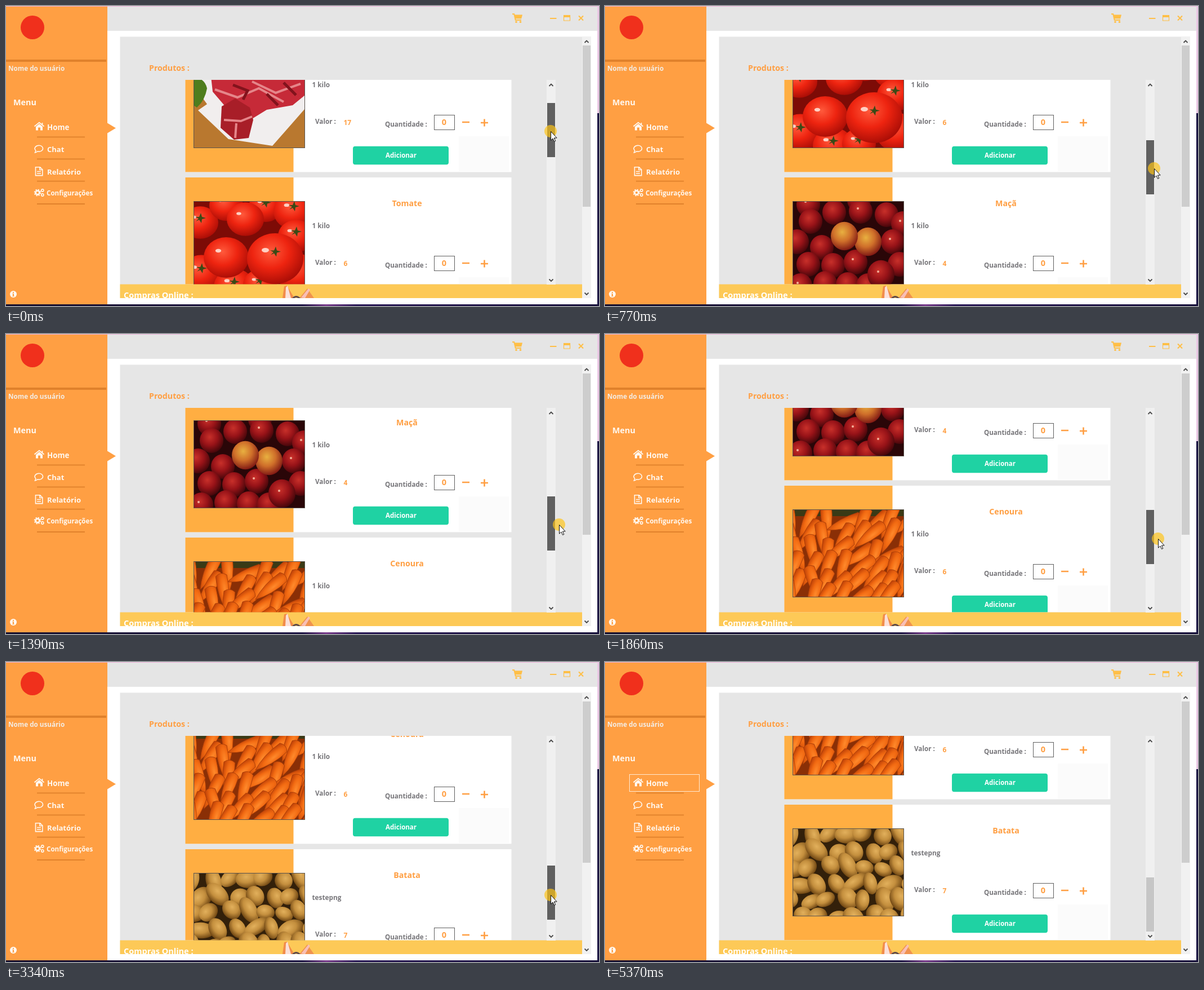
Write an HTML page that moves like this. It is 1053 by 532 pixels and loops after 5520 ms.

```html
<!DOCTYPE html>
<html lang="pt">
<head>
<meta charset="utf-8">
<title>Produtos</title>
<style>
html, body { margin: 0; width: 100%; height: 100%; overflow: hidden; background: #fff; }
svg { display: block; width: 1053px; height: 532px; }
text { font-family: "Open Sans", "Noto Sans", sans-serif; font-weight: 700; }
</style>
</head>
<body>
<svg id="stage" viewBox="0 0 1053 532" xmlns="http://www.w3.org/2000/svg">
  <defs>
    <clipPath id="listClip"><rect x="318" y="131" width="580" height="362.5"/></clipPath>
    <clipPath id="photoClip"><rect width="198" height="156"/></clipPath>
    <clipPath id="panelClip"><rect x="202" y="54" width="821" height="464"/></clipPath>
    <linearGradient id="edge">
      <stop offset="0" stop-color="#17112e"/><stop offset=".5" stop-color="#1d1644"/>
      <stop offset=".54" stop-color="#7a3c8c"/><stop offset=".59" stop-color="#2a1a56"/>
      <stop offset="1" stop-color="#17113a"/>
    </linearGradient>
  </defs>

  <!-- window -->
  <rect width="1053" height="532" fill="#fff"/>
  <rect x="180" y="1" width="870" height="43" fill="#e5e5e5"/>
  <rect width="1053" height="1" fill="#f0b4dc"/>
  <rect x="1050" width="3" height="190" fill="#ecc9e6"/>
  <rect x="1050" y="190" width="3" height="342" fill="#1b1542"/>
  <rect y="529" width="1053" height="3" fill="url(#edge)"/>

  <!-- sidebar -->
  <rect y="1" width="180" height="528" fill="#ff9f43"/>
  <circle cx="47" cy="38" r="21" fill="#f0301c"/>
  <rect y="95" width="178" height="4" fill="#e0812b"/>
  <path d="M180 207.5L195 216.5L180 225.5Z" fill="#ff9f43"/>
  <g fill="#fff8f0">
    <text x="4" y="115" font-size="11.7" fill="#f3ece4">Nome do usuário</text>
    <text x="13" y="176" font-size="14.4">Menu</text>
    <text x="73" y="220" font-size="13.3">Home</text>
    <text x="73" y="259" font-size="13">Chat</text>
    <text x="73" y="299" font-size="13.1">Relatório</text>
    <text x="72" y="336" font-size="11.6">Configurações</text>
    <path d="M53 214L59 209L65 214V220.5H61V215.5H57V220.5H53Z"/>
    <path d="M50.5 213.5L59 206.5L67.5 213.5M64.5 207V211" fill="none" stroke="#fff8f0" stroke-width="1.7"/>
    <circle cx="13" cy="511" r="6"/>
    <path d="M12 507h2v2h-2zM11.3 510H14v4h.8v1h-3.6v-1h.8v-3h-.7z" fill="#ff9f43"/>
  </g>
  <g fill="none" stroke="#fff8f0" stroke-width="1.6">
    <path d="M51.5 260L53 256.5C48.5 252 53 247.3 58.5 247.3C63 247.3 65.5 250 65.5 252.7C65.5 256.5 61 259 56 257.8Q54 259.8 51.5 260Z"/>
    <path d="M52.5 285.8H60.5L64.8 290V300.6H52.5ZM60 286V290.5H64.5M55 293.5H62M55 297H62"/>
    <circle cx="56" cy="331" r="3.4" stroke-width="2.6"/>
    <circle cx="56" cy="331" r="5.4" stroke-width="1.8" stroke-dasharray="2.3 1.94"/>
    <circle cx="64.8" cy="327" r="2.1"/>
    <circle cx="64.8" cy="335" r="2.1"/>
  </g>
  <path d="M55 232.3H140M55 271.4H140M55 310.6H140M55 351H140" stroke="#e0812b" stroke-width="1.8"/>
  <rect id="focus" x="43.5" y="199.5" width="124" height="30" fill="none" stroke="#ffe9d2"/>

  <!-- title bar icons -->
  <g fill="none" stroke="#ffbf47" stroke-width="2">
    <path d="M899 14.2H902.3L904.8 25H915"/>
    <path d="M903 15.5H917L915.2 22.5H904.6Z" fill="#ffbf47" stroke="none"/>
    <g fill="#ffbf47" stroke="none"><circle cx="906" cy="28.2" r="1.8"/><circle cx="913.5" cy="28.2" r="1.8"/></g>
    <path d="M966 22H977.5"/>
    <path d="M990.5 16.8V26H1001.5V16.8" stroke-width="1.2"/>
    <path d="M990 18H1002" stroke-width="4"/>
    <path d="M1017 17.5L1025 25.5M1025 17.5L1017 25.5"/>
  </g>

  <!-- main panel -->
  <rect x="202.5" y="54.5" width="820.5" height="463.5" fill="#e6e6e6"/>
  <text x="254" y="115" font-size="14.2" fill="#ff9f43">Produtos :</text>
  <g clip-path="url(#listClip)"><g id="list"></g></g>
  <g clip-path="url(#panelClip)">
    <rect x="202.5" y="493.5" width="820.5" height="24.5" fill="#fdc957"/>
    <text x="209" y="518" font-size="14.5" fill="#fff">Compras Online :</text>
    <path d="M491 518L494 497L499 496L512 518Z" fill="#f28c4a"/>
    <path d="M497 499L500 496L506 518H496Z" fill="#fbe0d8"/>
    <path d="M521 518L535 501L547 518Z" fill="#f0924f"/>
    <path d="M524 517L537 501L540 503L531 518Z" fill="#f8bfb6"/>
    <path d="M509 519Q515 512 522 519" fill="none" stroke="#5f4a4a" stroke-width="3"/>
  </g>

  <!-- scroll bars -->
  <rect x="1023" y="54" width="16" height="464" fill="#f1f1f1"/>
  <rect x="1024" y="70" width="14" height="286" fill="#cdcdcd"/>
  <rect x="960" y="131" width="16" height="363" fill="#f0f0f0"/>
  <rect id="thumb" x="961" width="14" height="96"/>
  <path d="M1027.5 65L1031 61.5L1034.5 65M1027.5 508.5L1031 512L1034.5 508.5M964.5 142L968 138.5L971.5 142M964.5 484.5L968 488L971.5 484.5"
        fill="none" stroke="#4a4a4a" stroke-width="1.8"/>

  <g id="pointer">
    <circle id="halo" r="11"/>
    <path d="M.5 .5V16.2L4 12.9L6.5 18.4L8.8 17.4L6.4 12H11.2Z" fill="#fff" stroke="#111" stroke-width="1"/>
  </g>
</svg>
<script>
const NS = "http://www.w3.org/2000/svg";
const $ = id => document.getElementById(id);

function add(parent, tag, attrs, label) {
  const el = document.createElementNS(NS, tag);
  for (const key in attrs) el.setAttribute(key, attrs[key]);
  if (label !== undefined) el.textContent = label;
  parent.appendChild(el);
  return el;
}

function seeded(seed) {
  return () => (seed = (seed * 16807) % 2147483647) / 2147483647;
}

// Soft ball shading: light near the upper left, dark at the rim.
function shade(id, light, mid, dark) {
  const g = add(document.querySelector("defs"), "radialGradient", { id, cx: .42, cy: .36, r: .66 });
  [[0, light], [.5, mid], [1, dark]].forEach(([offset, color]) =>
    add(g, "stop", { offset, "stop-color": color }));
  return `url(#${id})`;
}

const fills = {
  tomato: shade("tomato", "#ff5a3c", "#ee2410", "#a90d06"),
  apple: shade("apple", "#c8302a", "#981318", "#42060a"),
  gold: shade("gold", "#e8b040", "#cf6f2a", "#7e1713"),
  carrot: shade("carrot", "#ff8a2c", "#f26a12", "#c24408"),
  potato: shade("potato", "#e2b05c", "#c48f3e", "#6e4512")
};

const backdrop = (g, fill) => add(g, "rect", { width: 198, height: 156, fill });

function drawMeat(g) {
  backdrop(g, "#b9782f");
  add(g, "path", { d: "M0 45L24 78L8 89L62 140L140 152L198 86V0H0Z", fill: "#f1eeee" });
  add(g, "path", { d: "M0 30Q20 32 24 50Q20 72 6 84L0 80Z", fill: "#4f7d1d" });
  add(g, "path", { d: "M30 20L198 10V62L176 80L130 88L104 104L58 84L34 56Z", fill: "#c62a38" });
  add(g, "path", { d: "M50 82L74 68L100 84L106 106L98 138L72 141L48 120Z", fill: "#a81e28" });
  add(g, "path", { d: "M38 52L78 66L116 50L160 74M104 38L146 58L190 42M54 106L84 108L104 100M76 112L74 138",
    fill: "none", stroke: "#e5868a", "stroke-width": 4 });
  add(g, "path", { d: "M70 44L96 54L88 70M130 60L150 80M160 40L182 62", fill: "none", stroke: "#82131c", "stroke-width": 5 });
}

function drawTomatoes(g) {
  backdrop(g, "#7d0b06");
  const balls = [[12, 38, 32], [58, 8, 30], [128, 10, 30], [178, 18, 36], [92, 32, 33], [182, 62, 32],
    [14, 128, 36], [186, 128, 38], [72, 152, 36], [118, 148, 30], [58, 100, 40], [145, 102, 50]];
  balls.forEach(([cx, cy, r], i) => {
    add(g, "ellipse", { cx, cy, rx: r, ry: r * .9, fill: fills.tomato });
    add(g, "ellipse", { cx: cx - r * .35, cy: cy - r * .3, rx: r * .13, ry: r * .08, fill: "#ffd0c4" });
    if (i % 3 != 1) add(g, "path", { transform: `translate(${cx} ${cy - r * .25})`,
      d: "M-9 -2L-2 -2L1 -9L3 -2L10 0L3 2L2 9L-2 3L-8 6L-3 1Z", fill: "#3b4a16" });
  });
}

function drawApples(g) {
  backdrop(g, "#2a0608");
  const balls = [[28, 6], [118, -2], [74, 20], [121, 18], [167, 24], [32, 36], [196, 40], [8, 72],
    [52, 82], [178, 72], [28, 112], [72, 114], [112, 108], [190, 112], [58, 146], [14, 150],
    [98, 148], [134, 150], [157, 130], [134, 72], [92, 62]];
  balls.forEach(([cx, cy], i) => {
    const r = i > 17 ? 24 : 21;
    add(g, "ellipse", { cx, cy, rx: r, ry: r * 1.05, fill: i > 18 ? fills.gold : fills.apple });
    if (i % 3 == 0) add(g, "circle", { cx: cx - 5, cy: cy - 5, r: 2, fill: "#f2b09a" });
  });
}

function drawCarrots(g) {
  backdrop(g, "#8a2f06");
  add(g, "rect", { width: 198, height: 12, fill: "#3a3a16" });
  const rnd = seeded(77);
  for (let row = 0; row < 6; row++) for (let col = 0; col < 8; col++) {
    const x = col * 28 + rnd() * 14 - 4, y = 18 + row * 27 + rnd() * 12;
    const turn = (col < 3 ? 70 : 105) + rnd() * 55;
    add(g, "path", { transform: `translate(${x} ${y}) rotate(${turn})`,
      d: "M-28 -10Q-36 0 -28 10Q8 12 36 0Q8 -12 -28 -10Z", fill: fills.carrot,
      stroke: "#a63c08", "stroke-width": .8 });
  }
}

function drawPotatoes(g) {
  backdrop(g, "#33200a");
  const rnd = seeded(41);
  for (let row = 0; row < 6; row++) for (let col = 0; col < 7; col++) {
    const x = col * 32 + (row % 2) * 15 + rnd() * 10 - 6, y = 6 + row * 29 + rnd() * 10;
    add(g, "ellipse", { transform: `translate(${x} ${y}) rotate(${rnd() * 150 - 50})`,
      rx: 16 + rnd() * 9, ry: 12 + rnd() * 5, fill: fills.potato });
  }
}

const products = [
  ["Carne", "1 kilo", 17, drawMeat],
  ["Tomate", "1 kilo", 6, drawTomatoes],
  ["Maçã", "1 kilo", 4, drawApples],
  ["Cenoura", "1 kilo", 6, drawCarrots],
  ["Batata", "testepng", 7, drawPotatoes]
];

products.forEach(([name, note, price, drawPhoto], i) => {
  const card = add($("list"), "g", { transform: `translate(0 ${54 + i * 250})` });
  const box = (x, y, width, height, fill, more) => add(card, "rect", { x, y, width, height, fill, ...more });
  const label = (x, y, size, fill, value, anchor = "start") =>
    add(card, "text", { x, y, fill, "font-size": size, "text-anchor": anchor }, value);
  const orange = "#ff9f43", gray = "#77767a";

  box(318.4, 0, 579.1, 240.4, "#fff");
  box(318.4, 0, 192.1, 240.4, "#ffae42");
  const photo = add(card, "g", { transform: "translate(333 42)", "clip-path": "url(#photoClip)" });
  drawPhoto(photo);
  box(333.5, 42.5, 197, 155, "none", { stroke: "#5a544e" });

  label(712, 51, 14.2, orange, name, "middle");
  label(543.5, 90, 11.8, gray, note);
  label(549, 155, 11.7, gray, "Valor :");
  label(599.5, 156.5, 12, orange, price);
  label(673, 159.5, 11.6, gray, "Quantidade :");
  box(760.5, 139.5, 36, 26, "#fff", { stroke: "#5f5f5f" });
  label(778, 157, 14.5, orange, "0", "middle");
  add(card, "path", { d: "M810 152H823M843 153H856M849.5 146.5V159.5", stroke: orange, "stroke-width": 2.6 });
  box(616, 194.8, 170, 32.5, "#1fd2a3", { rx: 4 });
  label(701.5, 215, 11.5, "#fff", "Adicionar", "middle");
  box(804, 177, 89, 62, "#fbfbfb");
});

// Keys are [step, value]; the screen refreshes once every 77.5 ms.
const LOOP = 5520, STEP = 77.5;
const scrollKeys = [[0, 0], [10, 250], [18, 443], [26, 565], [37, 565], [43, 722], [46, 801]];
const xKeys = [[0, 967], [10, 975], [18, 982], [27, 982], [32, 967], [43, 967], [51, 972], [53, 972], [59, 1013]];
const yKeys = [[0, 222], [10, 288], [18, 338], [26, 371], [37, 371], [43, 413], [51, 450], [53, 450], [59, 533]];

function at(keys, n) {
  const j = keys.findIndex(k => k[0] > n);
  if (j < 0) return keys[keys.length - 1][1];
  const [n0, v0] = keys[j - 1], [n1, v1] = keys[j];
  return v0 + (v1 - v0) * (n - n0) / (n1 - n0);
}

const within = (n, a, b) => n >= a && n < b;

function thumbColor(n) {
  if (n >= 65) return "#c6c6c6";
  return within(n, 28, 38) || n >= 52 ? "#a6a6a6" : "#606060";
}

function haloColor(n) {
  if (n < 28 || within(n, 38, 51)) return "rgba(255,196,20,.68)";
  const tap = within(n, 28, 30) || within(n, 36, 38) || within(n, 51, 53);
  return tap ? "rgba(222,214,20,.72)" : "none";
}

function render(t) {
  const n = Math.floor((t + 8) / STEP);
  const scroll = Math.round(at(scrollKeys, n));
  $("list").setAttribute("transform", `translate(0 ${-scroll})`);
  $("thumb").setAttribute("y", Math.round(172 + scroll / 3.814));
  $("thumb").setAttribute("fill", thumbColor(n));

  const x = Math.round(at(xKeys, n)), y = Math.round(at(yKeys, n));
  $("pointer").setAttribute("transform", `translate(${x} ${y})`);
  $("pointer").style.display = n < 59 ? "" : "none";
  $("halo").setAttribute("fill", haloColor(n));

  $("focus").style.display = t >= 5370 ? "" : "none";
}

const start = performance.now();
function tick() {
  render((performance.now() - start) % LOOP);
  requestAnimationFrame(tick);
}
tick();
</script>
</body>
</html>
```
